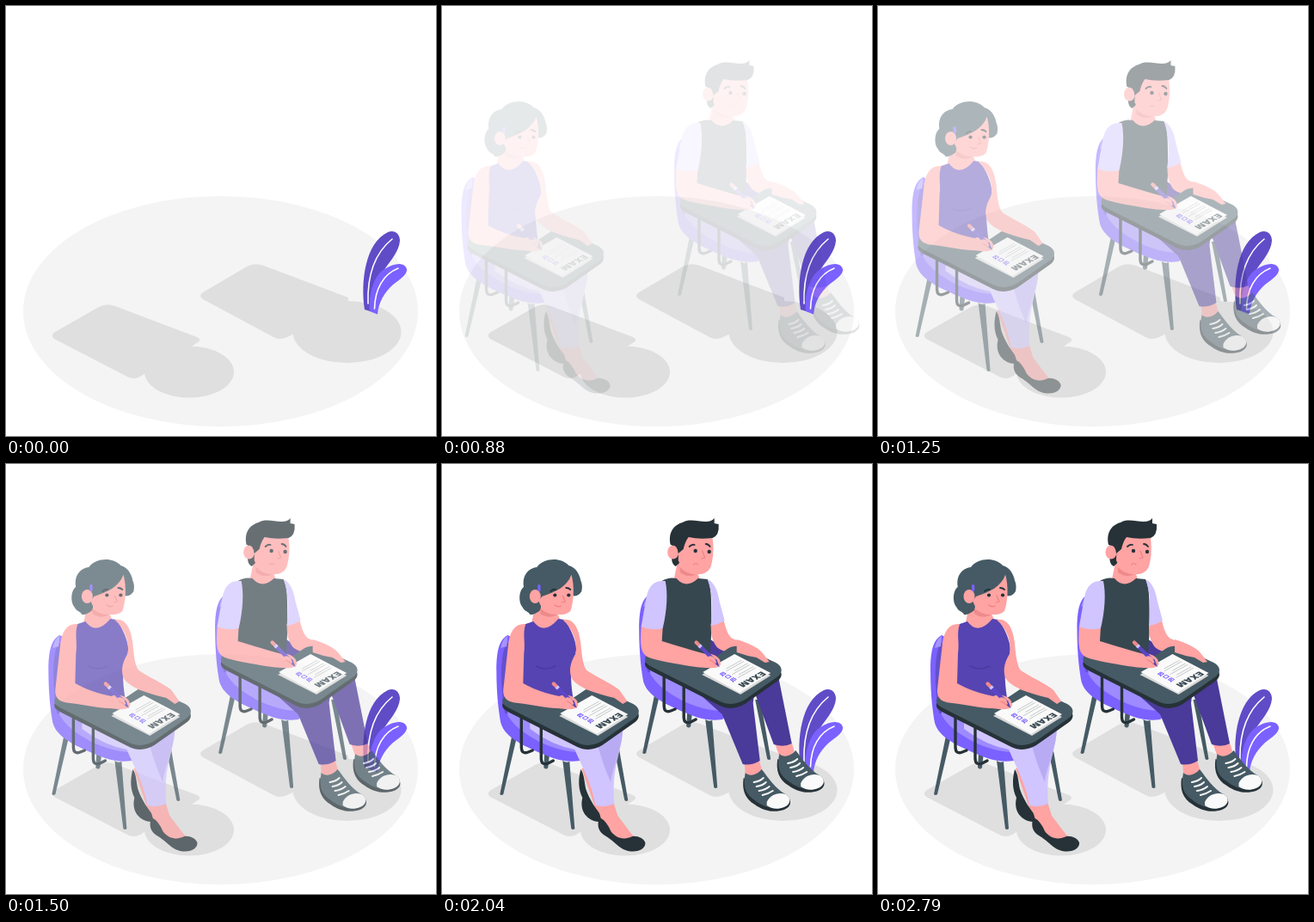
Animation of 500 by 500 pixels, one loop 2.83 s. Source, as an HTML page:

```html
<!DOCTYPE html>
<html lang="en">
<head>
<meta charset="utf-8">
<title>Exam</title>
<style>
  html, body { margin: 0; width: 100%; height: 100%; overflow: hidden; background: #fff; }
  svg { display: block; width: 100%; height: 100%; }
  .skin { fill: #ffa3a3; }
  .dark { fill: #263238; }
  .slate { fill: #37474f; }
  .grey { fill: #455a64; }
  .violet { fill: #7b61ff; }
  .plum { fill: #5644b2; }
  .jeans { fill: #4a3a99; }
  .lilac { fill: #d0c5ff; }
  .line { fill: none; stroke-linecap: round; stroke-linejoin: round; }
  .shade { stroke: #ee8080; stroke-width: 1.2; }
  .brow { stroke: #263238; stroke-width: 1.8; }
  .exam { font: 900 10.2px Inter, Arial, sans-serif; fill: #37474f; }
</style>
</head>
<body>
<svg viewBox="0 0 500 500">
  <defs>
    <g id="chair">
      <g class="grey">
        <path d="M79 316h6L69 384q-2 2-4 0z"/>
        <path d="M196 322h6l12 69q-2 2-4 0z"/>
        <path d="M117 335h6l-2 18q-2 3-5 0z"/>
      </g>
      <path class="violet" d="M74 199C65 204 61 215 61 240C61 270 64 290 66 301C70 315 85 324 105 333C125 342 140 348 158 345L170 330L150 300L100 270L95 210Z"/>
      <path fill="#6350cc" d="M73 208C64 222 66 264 71 290L98 290V215Z"/>
      <path fill="#a594ff" d="M74 200C69 203 67 208 66 214L73 212Z"/>
      <path fill="#9d8bff" d="M74 284L150 318L160 334C140 339 88 318 74 292Z"/>
      <path class="grey" d="M138 345q4 3 8 1l6 78q-2 2-4 0z"/>
    </g>
    <path id="board" d="M68 274C70 268 80 268 100 270L148 273C160 267 163 261 172 260C177 259 181 261 185 263L220 279C228 283 229 291 221 296L184 322C176 327 165 329 155 324L76 284C70 281 67 278 68 274Z"/>
    <g id="desk">
      <g class="line" stroke="#263238" stroke-width="3.4">
        <path d="M90 285V329Q90 338 98 335L103 333"/>
        <path d="M113 300V342Q113 351 121 348L127 345"/>
      </g>
      <use href="#board" class="dark" y="5"/>
      <use href="#board" class="grey"/>
      <path fill="#d9d9d9" d="M134 293L169 273L214 294L179 316Z"/>
      <path fill="#fafafa" d="M135 290L172 269L214 291L178 314Z"/>
      <g transform="matrix(-.86 .48 -.86 -.47 203 289)">
        <text class="exam">EXAM</text>
        <g class="line" stroke="#c4c7c9" stroke-width=".9">
          <path d="M0 8H23M0 11H19M0 16H23M0 19H17M0 24H23M0 27H20"/>
          <path stroke="#7b61ff" d="M27 7h4v4h-4zM27 14h4v4h-4zM27 21h4v4h-4zM28 23l1 1 3-4M28 9l1 1 3-4"/>
        </g>
      </g>
    </g>
    <g id="hand">
      <path class="skin" d="M134 270C144 266 152 271 155 276L156 281C153 286 146 286 134 284Z"/>
      <g class="line" stroke-width="4.4">
        <path stroke="#5b46c8" d="M133 261L149 277"/>
        <path stroke="#d0c5ff" stroke-linecap="butt" d="M130.500 258.500L133 261"/>
        <path stroke="#ee8a8a" d="M127.500 255.500L129.500 257.500"/>
      </g>
      <path class="plum" d="M147 279l4-4 3.500 9z"/>
      <path class="skin" d="M141 272q5-2 8 2l2 5q-4 3-8 0z"/>
      <path class="line shade" d="M143 276q4 1 7 5"/>
    </g>
    <g id="shoe">
      <path class="dark" d="M353 365C351 378 354 389 366 396C378 405 391 405 400 402C407 399 409 394 406 389Z"/>
      <path class="grey" d="M355 359C360 364 368 362 374 355C382 365 390 378 402 384C409 388 408 396 400 399C388 403 375 398 366 391C355 384 352 375 355 359Z"/>
      <path fill="#fafafa" d="M380 393C384 384 394 381 402 384C409 388 408 396 400 399C393 402 385 401 380 397Z"/>
      <path class="line" stroke="#fafafa" stroke-width="2" d="M365 370q7-1 11-5M368 375q7-1 11-5M371 380q7-1 12-5M375 385q6-1 12-5"/>
    </g>
  </defs>

  <ellipse cx="249.5" cy="355" rx="229.5" ry="134" fill="#f4f4f4"/>
  <g fill="#dfdfdf">
    <path d="M57 379L108 350Q117 345 127 349L222 385Q228 388 223 391L217 395L162 427L156 431Q148 435 141 431L56 387Q51 383 57 379Z"/>
    <ellipse cx="213" cy="425.5" rx="52" ry="30"/>
    <path d="M229 333L280 303Q289 298 300 302L398 339L398 345L333 382L327 385Q318 389 311 385L229 341Q223 337 229 333Z"/>
    <ellipse cx="396.5" cy="379" rx="63" ry="36"/>
  </g>
  <path fill="#604cc7" d="M417 353C412 320 418 275 444 263C452 260 458 265 458 273C457 285 448 295 441 305C433 316 428 340 427 356Z"/>
  <path class="violet" d="M423 355C421 335 428 313 440 306C452 298 464 298 466 306C467 312 458 318 450 324C440 333 433 345 432 358.500Z"/>
  <path class="line" stroke="#fff" stroke-width="1.6" d="M421 346C420 315 428 288 449 271M428.500 352C429 330 438 312 456 305"/>

  <g id="man">
    <use href="#chair" x="170.500" y="-48"/>
    <path class="skin" d="M354 345L371 344L375 358Q364 368 355 360ZM389 324L408 321L412 334Q404 344 394 338Z"/>
    <use href="#shoe" x="39.500" y="-22"/>
    <use href="#shoe"/>
    <path class="jeans" d="M364 262L394 250L409 325Q400 330 388 326L366 266Z"/>
    <path class="jeans" d="M300 266L366 262L364 278L372 345Q362 351 352 349L328 291Z"/>
    <path class="jeans" d="M308 200L330 214L342 216L318 234L290 222Z"/>
    <path class="skin" d="M276 115L298 122L302 134L288 146L272 134Z"/>
    <path class="slate" d="M258 136Q266 131 275 133Q286 146 300 133L311 134C317 144 315 170 316 190L314 220L285 228L257 208Z"/>
    <path class="skin" d="M315 186L330 182C333 195 336 200 340 203C355 208 368 213 374 219L383 230L378 232L366 227C350 223 330 220 322 213C316 205 315 198 315 186Z"/>
    <path class="lilac" d="M311 134C319 137 323 148 325 160L331 182Q323 187 315 188C317 165 317 150 311 134Z"/>
    <use href="#desk" x="170.500" y="-48"/>
    <path class="skin" d="M345 204C358 208 370 213 375 220L383 230L378 231L368 225Q356 223 345 219Z"/>
    <path class="skin" d="M234 188C233 205 233 213 236 219C239 226 250 227 262 230C285 234 298 237 312 237L314 222C300 219 275 211 258 206L259 189Z"/>
    <path class="lilac" d="M262 136C250 135 243 140 240 155C237 172 235 182 234 189C242 193 252 193 259 191C264 170 265 150 262 136Z"/>
    <use href="#hand" x="170.500" y="-48"/>
    <path class="dark" d="M269 84L282 84L282 112L274 119Q268 116 270 106Z"/>
    <path class="skin" d="M278 84L316 82C319 95 318 108 315 119C311 129 300 130 290 126Q280 121 277 112Z"/>
    <path fill="#ee8a8a" d="M279 120Q287 128 298 128.500Q288 133 279 126Z"/>
    <ellipse class="skin" cx="271" cy="102.500" rx="6.500" ry="8"/>
    <path class="dark" d="M268 94C265 79 272 71 282 68C290 63 300 67 309 67Q316 67 319 63L319 69L324 70Q325 83 317 86Q301 88 289 85Q285 90 283 99L277 104Q276 93 268 94Z"/>
    <g class="dark"><circle cx="297" cy="101" r="2.200"/><circle cx="313" cy="102" r="2.200"/></g>
    <path class="line brow" d="M290 96Q293 93 296 94M309 93Q312 93 314 96"/>
    <path class="line shade" d="M305 101L308 109L304 110M295 117Q298 114 300 117"/>
  </g>

  <g id="woman">
    <use href="#chair"/>
    <path class="skin" d="M160 354L176 350L190 412L180 412Z"/>
    <path class="dark" d="M159 355C156 367 156 378 161 388C157 404 167 415 180 416L185 411C177 402 169 390 165 378C163 369 163 360 159 355Z"/>
    <path class="skin" d="M177 393L197 393L202 409L221 434Q203 440 193 428L183 414Z"/>
    <path class="dark" d="M181 411C177 420 180 428 187 432C198 438 205 450 218 450.500C228 451 235 446 234 440C232 435 225 432 219 433C209 438 200 435 194 427Q189 415 181 411Z"/>
    <path class="lilac" d="M100 296L208 300L207 320C203 340 195 360 198 395Q188 400 176 397C173 375 162 355 152 332Q125 327 100 308Z"/>
    <path fill="#b9abf3" d="M183 318L208 310C205 338 196 352 194 370Q185 350 179 328Z"/>
    <path class="skin" d="M106 165L131 172L135 181L120 198L102 184Z"/>
    <path class="plum" d="M92 187L104 183Q116 200 133 180L140 181C150 195 156 212 153 221C146 235 147 250 150 272L92 268C91 235 90 205 92 187Z"/>
    <path class="line" stroke="#46369a" stroke-width="1.200" d="M107 235Q118 241 130 235"/>
    <path class="skin" d="M138 181C152 179 157 193 159 208C160 222 162 236 166 240C178 248 195 256 203 262L213 276L208 279L198 273C185 270 155 260 149 250C145 242 146 232 153 221C156 208 150 192 138 181Z"/>
    <use href="#desk"/>
    <path class="skin" d="M170 243C183 250 198 258 204 263L213 276L208 279L198 272Q184 269 165 262Z"/>
    <path class="skin" d="M95 186C83 185 77 194 75 208L69 262C68 274 76 277 86 278C105 280 122 285 141 284L142 271C128 270 108 264 92 255L93 220C95 208 91 197 95 186Z"/>
    <use href="#hand"/>
    <path class="grey" d="M95 142C87 144 86 160 91 166C94 172 98 171 100 175Q105 176 112 170L120 140ZM142 122C156 124 163 138 160 148Q156 155 149 153Z"/>
    <path class="skin" d="M108 145L130 128L148 128C152 142 151 160 147 171C140 178 126 175 117 171Q109 164 108 145Z"/>
    <path fill="#ee8a8a" d="M112 168Q122 176 132 175Q122 181 112 174Z"/>
    <path class="grey" d="M107 163Q92 158 93 144C90 130 98 121 108 120C116 109 136 108 145 118C153 120 157 127 159 135Q153 128 148 129C143 143 129 149 114 154Z"/>
    <ellipse class="skin" cx="106" cy="154" rx="6.500" ry="8"/>
    <rect class="violet" x="109" y="140" width="3.200" height="8" rx="1.600"/>
    <g class="dark"><circle cx="129" cy="152.500" r="2.100"/><circle cx="145" cy="152.500" r="2.100"/></g>
    <path class="line brow" d="M124 148Q127 145 130 146M142 144Q145 144 147 146"/>
    <path class="line shade" d="M138 153L141 160L137 161M129 164Q132 167 136 165"/>
  </g>
</svg>
<script>
  const LOOP = 2830;
  // time in ms, distance from rest, opacity
  const keys = [
    [350, 43, 0], [880, 38.5, .13], [1250, 21.5, .44], [1420, 14.7, .62],
    [1710, 4.4, .87], [2040, -2.3, 1], [2380, -4, 1], [2790, 0, 1]
  ];
  const man = document.getElementById('man');
  const woman = document.getElementById('woman');

  function slope(i, col) {
    if (i === 0) return 0;
    const a = keys[i - 1], b = keys[Math.min(i + 1, keys.length - 1)];
    return (b[col] - a[col]) / (b[0] - a[0]);
  }

  // Smooth curve through the keys
  function valueAt(t, col) {
    const last = keys.length - 1;
    if (t <= keys[0][0]) return keys[0][col];
    if (t >= keys[last][0]) return keys[last][col];
    const i = keys.findIndex(k => k[0] > t) - 1;
    const [a, b] = [keys[i], keys[i + 1]];
    const span = b[0] - a[0], s = (t - a[0]) / span, r = 1 - s;
    return r * r * (1 + 2 * s) * a[col] + s * s * (3 - 2 * s) * b[col]
      + span * s * r * (r * slope(i, col) - s * slope(i + 1, col));
  }

  function place(figure, x, opacity) {
    figure.setAttribute('transform', `translate(${x} 0)`);
    figure.setAttribute('opacity', opacity);
  }

  function draw() {
    const t = performance.now() % LOOP;
    const x = valueAt(t, 1);
    const opacity = t < 380 ? 0 : Math.min(1, valueAt(t, 2));
    place(man, x, opacity);
    place(woman, -x, opacity);
    requestAnimationFrame(draw);
  }
  draw();
</script>
</body>
</html>
```
